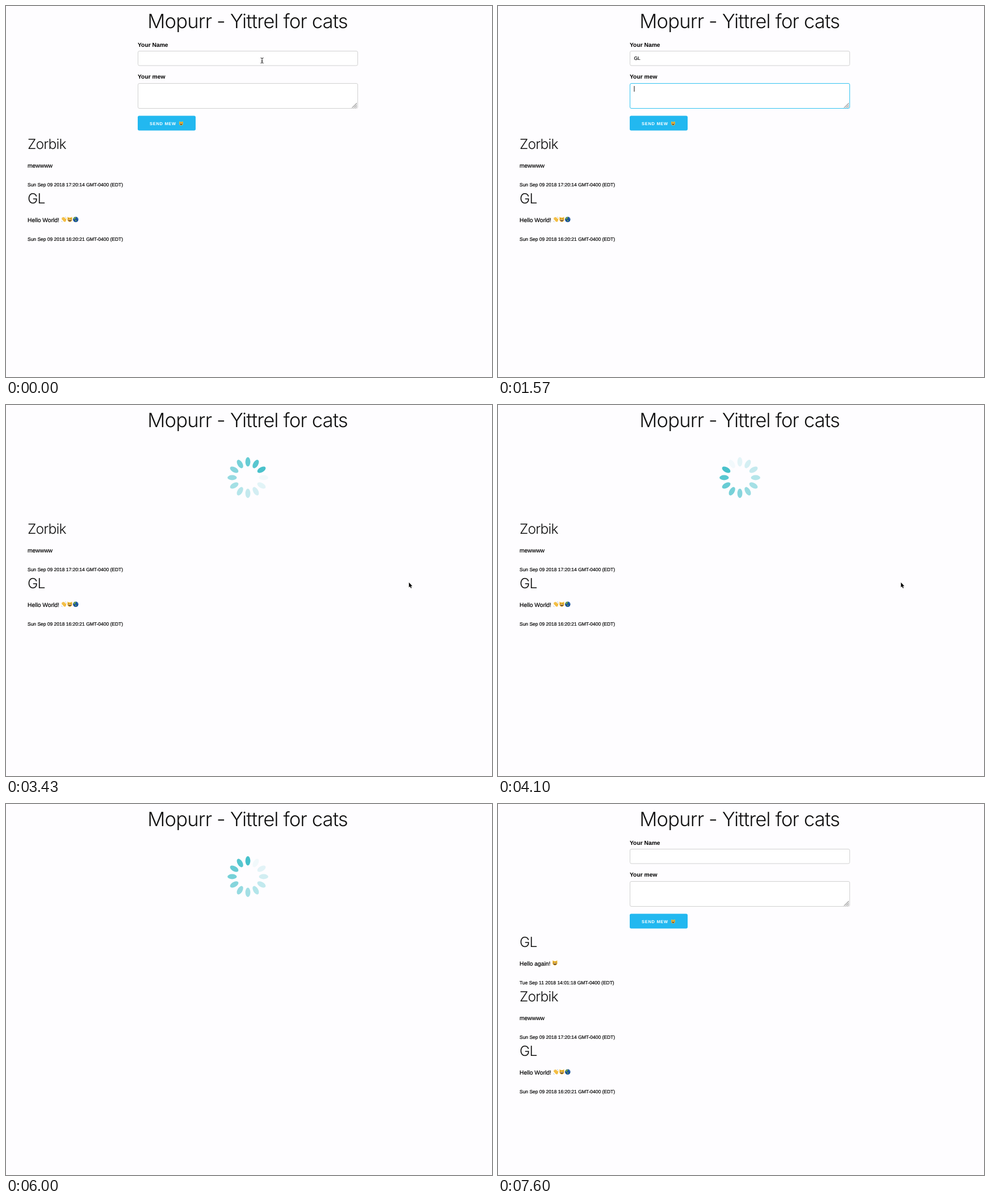
Animation, 856 px wide and 654 px high, one loop 7630 ms. Source, as an HTML page:

```html
<!DOCTYPE html>
<html lang="en">
<head>
<meta charset="utf-8">
<title>Mopurr</title>
<style>
  html, body { margin: 0; width: 100%; height: 100%; overflow: hidden; background: #fefdff; }
  svg { display: block; }
  text {
    font: 10.3px "Liberation Sans", Arial, sans-serif; fill: #000; white-space: pre;
    stroke: #000; stroke-width: .2px; text-rendering: geometricPrecision;
  }
  .title, .name { font-family: Inter, "Liberation Sans", sans-serif; font-weight: 300; stroke: none; fill: #111; }
  .title { font-size: 34.6px; letter-spacing: -.85px; text-anchor: middle; }
  .name { font-size: 24.6px; letter-spacing: -.8px; }
  .date { font-size: 8.48px; }
  .label { font-weight: 700; stroke: none; }
  .field { fill: #fff; stroke: #d1d1d1; }
  .field.focus { stroke: #33c3f0; }
  .send { font-size: 7.5px; font-weight: 700; letter-spacing: .7px; fill: #fff; stroke: none; }
  #nameText { font-size: 8.3px; }
  #mewText { font: 9px "Liberation Mono", monospace; }
</style>
</head>
<body>
<svg width="856" height="654" viewBox="0 0 856 654">
  <defs>
    <symbol id="cat" viewBox="0 0 10 10">
      <path d="M1 .3 3.4 1.6H6.6L9 .3 9.3 5A4.3 4.3 0 0 1 .7 5Z" fill="#f5bd35"/>
      <path d="M2.2 3.8Q3 2.7 3.8 3.8M6.2 3.8Q7 2.7 7.8 3.8" fill="none" stroke="#4b3518" stroke-width=".9"/>
      <path d="M2 5.4H8Q7.5 8.3 5 8.3T2 5.4Z" fill="#5b3a1c"/>
      <path d="M2.7 5.5H7.3L7 6.3H3Z" fill="#fff"/>
    </symbol>
    <symbol id="wave" viewBox="0 0 10 10">
      <path d="M2 2.2 5.6 6M3.6 1.4 6.6 5M1.5 4 5 7.2M5.4 1.8 7.4 5M8.8 3.6 8 6.5" stroke="#f3bd42" stroke-width="1.5" stroke-linecap="round"/>
      <path d="M3.4 6 7 3.8 8.7 6.5Q8.6 9.3 6.4 9.3T3.4 6Z" fill="#f3bd42"/>
      <path d="M.5 7.5Q1 9 2.5 9.4M7 .5Q8.6.9 9.2 2" fill="none" stroke="#7c96a8" stroke-width=".6"/>
    </symbol>
    <symbol id="globe" viewBox="0 0 10 10">
      <circle cx="5" cy="5" r="4.8" fill="#174f9c"/>
      <path d="M1 3Q2.4.7 5 .8L5.6 2 4 3.6 3.3 5 1.8 4.4ZM4 5.3 6.6 6.4 5.2 9 4.3 7.5Z" fill="#6aa548"/>
      <path d="M6.5 1.5Q8.8 2.6 9 5L7.5 4Z" fill="#418bca"/>
    </symbol>
  </defs>

  <text class="title" x="425.6" y="38.5">Mopurr - Yittrel for cats</text>

  <g id="form">
    <text class="label" x="232" y="71.5">Your Name</text>
    <rect id="nameField" class="field" x="232.5" y="79.5" width="387" height="25.5" rx="2.5"/>
    <text id="nameText" x="239.5" y="95"></text>
    <text class="label" x="232" y="128">Your mew</text>
    <rect id="mewField" class="field" x="232.5" y="136.5" width="387" height="44" rx="2.5"/>
    <text id="mewText" x="239.5" y="150"></text>
    <use id="mewCat" href="#cat" x="309.5" y="141.5" width="10" height="10"/>
    <path d="M609.5 179.5 618 171M612.5 179.5 618 174M615.5 179.5 618 177" stroke="#555" stroke-width=".9"/>
    <path id="caret" d="M0 0V10" stroke="#111"/>
    <rect x="232" y="193.5" width="102" height="26" rx="2.7" fill="#22b8f0"/>
    <text class="send" x="253" y="210">SEND MEW</text>
    <use href="#cat" x="304.5" y="203" width="8" height="8"/>
  </g>

  <g id="spinner" transform="translate(426 128)" fill="#45c0ca"></g>
  <g id="list"></g>

  <path id="ibeam" d="M448.5 91.5Q451 91.5 451 93V99Q451 100.8 448.5 100.8M453.5 91.5Q451 91.5 451 93M451 99Q451 100.8 453.5 100.8M449.5 97H452.5" fill="none" stroke="#222"/>
  <path id="arrow" d="M0 0V8.8L2 7 3.4 10.2 4.7 9.6 3.4 6.5H6Z" stroke="#fff" stroke-width=".8" paint-order="stroke" fill="#000"/>
</svg>

<script>
const LOOP = 7630;
const $ = id => document.getElementById(id);
const list = $('list'), spinner = $('spinner');

function add(parent, tag, attrs, text = '') {
  const el = document.createElementNS('http://www.w3.org/2000/svg', tag);
  for (const key in attrs) el.setAttribute(key, attrs[key]);
  el.textContent = text;
  return parent.appendChild(el);
}

function addMew(name, message, emojis, emojiX, date) {
  const mew = add(list, 'g', {});
  add(mew, 'text', { class: 'name', x: 38, y: 252 }, name);
  add(mew, 'text', { x: 38, y: 284.5 }, message);
  emojis.forEach((id, i) => add(mew, 'use',
    { href: '#' + id, x: emojiX + i * 10.4, y: 275.3, width: 10, height: 10 }));
  add(mew, 'text', { class: 'date', x: 38, y: 318 }, date + ' GMT-0400 (EDT)');
  return mew;
}

const mews = [
  addMew('GL', 'Hello again!', ['cat'], 95.3, 'Tue Sep 11 2018 14:01:18'),
  addMew('Zorbik', 'mewwww', [], 0, 'Sun Sep 09 2018 17:20:14'),
  addMew('GL', 'Hello World!', ['wave', 'cat', 'globe'], 97, 'Sun Sep 09 2018 16:20:21')
];

const petals = Array.from({ length: 12 }, (_, i) =>
  add(spinner, 'ellipse', { cy: -27.7, rx: 4.4, ry: 8.2, transform: `rotate(${i * 30})` }));

// Pointer tip: time, x, y
const pointerPath = [
  [2400, 451, 96], [2630, 337, 222.5], [2860, 302, 209], [3160, 302, 209],
  [3400, 709.7, 312.8], [4690, 709.7, 312.8], [5000, 63.5, 96.8], [5150, 4, -14],
  [6080, 60, -14], [6230, 480, 78], [6430, 841, 161.3], [6560, 866, 172]
];

function pointerAt(t) {
  const next = pointerPath.findIndex(p => p[0] > t);
  if (next < 1) return null;
  const [t0, x0, y0] = pointerPath[next - 1], [t1, x1, y1] = pointerPath[next];
  const u = (t - t0) / (t1 - t0), ease = u * u * (3 - 2 * u);
  return [x0 + (x1 - x0) * ease, y0 + (y1 - y0) * ease];
}

const within = (t, from, to) => t >= from && t < to;
const show = (el, on) => el.style.display = on ? '' : 'none';
const typed = (text, t, start, step) =>
  text.slice(0, Math.max(0, Math.floor((t - start) / step) + 1));

function drawForm(t) {
  const filled = t < 3160;
  const inName = within(t, 230, 1500), inMew = within(t, 1500, 3160);
  const name = filled ? typed('GL', t, 1010, 130) : '';
  const mew = filled ? typed('Hello again! ', t, 1640, 45) : '';
  const hasCat = within(t, 2450, 3160);
  $('nameText').textContent = name;
  $('mewText').textContent = mew;
  $('nameField').classList.toggle('focus', inName);
  $('mewField').classList.toggle('focus', inMew);
  show($('mewCat'), hasCat);

  const blinkOn = inName ? (t - 230) % 1000 < 500 || within(t, 1000, 1500)
                         : t < 2750;
  const x = inName ? 240 + name.length * 5.4 : 240 + mew.length * 5.4 + (hasCat ? 9.5 : 0);
  show($('caret'), (inName || inMew) && blinkOn);
  $('caret').setAttribute('transform', `translate(${x} ${inName ? 87 : hasCat ? 142 : 141})`);
}

function draw(t) {
  const sending = within(t, 3160, 4250), reloading = within(t, 5700, 6800);
  const loading = sending || reloading;
  const posted = t >= 4250;
  show($('form'), !loading);
  show(spinner, loading);
  show(list, !reloading);
  drawForm(t);

  list.setAttribute('transform', `translate(0 ${sending ? -25 : 0})`);
  show(mews[0], posted);
  mews.forEach((mew, i) =>
    mew.setAttribute('transform', `translate(0 ${96 * (posted ? i : i - 1)})`));

  const head = (sending ? 2.2 + (t - 3430) * .012 : 5.3 + (t - 6430) * .012) + 240;
  petals.forEach((petal, i) => petal.setAttribute('opacity', 1 - (head - i) % 12 / 12));

  const tip = pointerAt(t);
  show($('ibeam'), t < 1000);
  show($('arrow'), tip);
  if (tip) $('arrow').setAttribute('transform', `translate(${tip})`);
}

const start = performance.now();
function tick() {
  draw((performance.now() - start) % LOOP);
  requestAnimationFrame(tick);
}
tick();
</script>
</body>
</html>
```
